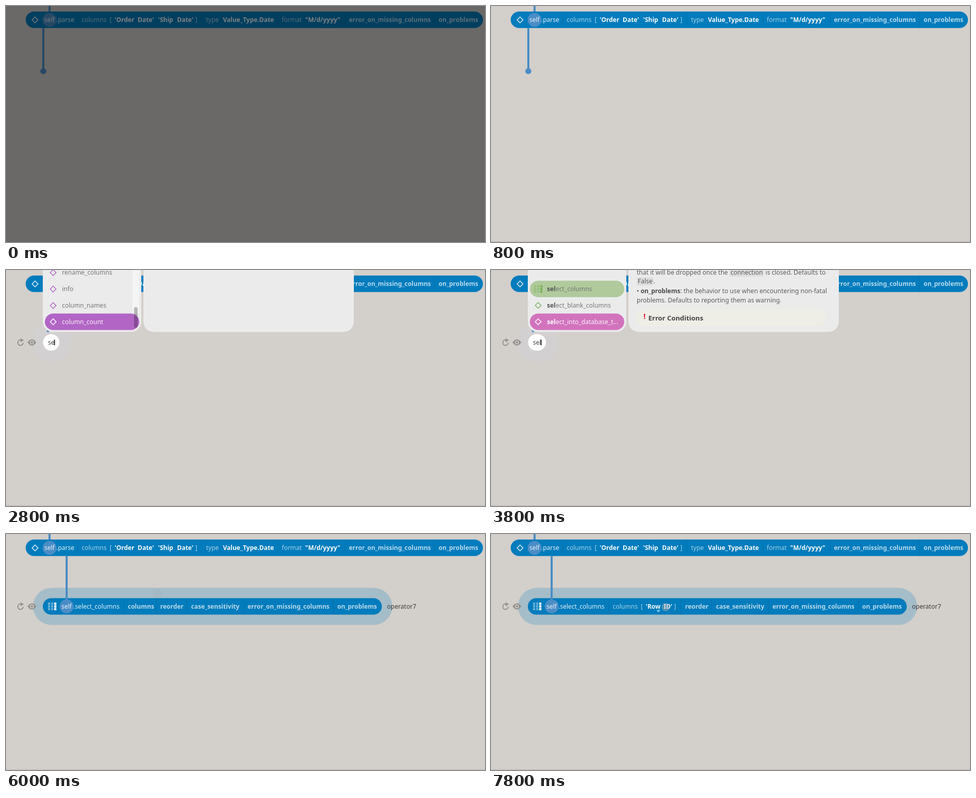
These frames come from a looping animation (924x458 px, 8 s). An HTML page with a canvas:

```html
<!DOCTYPE html>
<html lang="en">
<head>
<meta charset="utf-8">
<title>Node editor</title>
<style>
  html, body { margin: 0; width: 100%; height: 100%; overflow: hidden; background: #d3cfcb; }
  canvas { display: block; }
</style>
</head>
<body>
<canvas id="stage" width="924" height="458"></canvas>
<script>
const ctx = document.getElementById('stage').getContext('2d');
const LOOP = 8000, STEP = 200;
const FONT = '"Noto Sans", sans-serif';
const BLUE = '#027cbc', EDGE = '#4a8dc6', PANEL = '#ebebec', GREY = '#93908d';
const PURPLE = '#b265c5', PINK = '#d273bd', GREEN = '#79af5b', PALE_GREEN = '#b0ca9c';
const white = a => `rgba(255,255,255,${a})`;

const progress = (t, from, to) => Math.min(1, Math.max(0, (t - from) / (to - from)));
const ease = p => p * p * (3 - 2 * p);

function text(str, x, y, color, weight = 400, size = 12) {
  ctx.font = `${weight} ${size}px ${FONT}`;
  ctx.fillStyle = color;
  ctx.fillText(str, x, y);
  return x + ctx.measureText(str).width;
}

function box(x, y, w, h, r, color) {
  ctx.beginPath();
  ctx.roundRect(x, y, w, h, r);
  ctx.fillStyle = color;
  ctx.fill();
}

function disc(x, y, r, color) {
  ctx.beginPath();
  ctx.arc(x, y, r, 0, 7);
  ctx.fillStyle = color;
  ctx.fill();
}

function triangle(ax, ay, bx, by, cx, cy, color) {
  ctx.beginPath();
  ctx.moveTo(ax, ay);
  ctx.lineTo(bx, by);
  ctx.lineTo(cx, cy);
  ctx.fillStyle = color;
  ctx.fill();
}

function faded(alpha, draw) {
  if (alpha <= 0) return;
  ctx.save();
  ctx.globalAlpha = alpha;
  draw();
  ctx.restore();
}

function diamond(x, y, color) {
  ctx.save();
  ctx.translate(x, y);
  ctx.rotate(Math.PI / 4);
  ctx.strokeStyle = color;
  ctx.lineWidth = 1.4;
  ctx.strokeRect(-4, -4, 8, 8);
  ctx.restore();
}

// Table icon whose last column is emphasised.
function tableIcon(x, y, color) {
  for (let col = 0; col < 3; col++)
    for (let row = 0; row < 3; row++)
      faded(col === 2 ? 1 : 0.4, () => box(x + col * 6, y + row * 5.3, 4.2, 4.4, 0.5, color));
}

function nodeIcons() {
  ctx.strokeStyle = GREY;
  ctx.lineWidth = 1.8;
  ctx.beginPath();
  ctx.arc(28, 141, 5.3, 0, 4.7);
  ctx.stroke();
  triangle(28, 132.5, 34.5, 136.2, 28, 140, GREY);

  ctx.beginPath();
  ctx.moveTo(41.5, 140.5);
  ctx.quadraticCurveTo(50, 128.5, 58.5, 140.5);
  ctx.quadraticCurveTo(50, 152.5, 41.5, 140.5);
  ctx.fill();
  disc(50, 140.5, 3.8, '#d3cfcb');
  disc(50, 140.5, 2.2, GREY);
}

const separators = (xs, y) => xs.forEach(x => box(x, y, 1, 31, 0, 'rgba(0,0,0,.07)'));
const label = (str, x, y) => text(str, x, y, white(0.66));
const value = (str, x, y) => text(str, x, y, white(0.98), 700);
const unset = (str, x, y) => text(str, x, y, white(0.72), 700);

function selfPort(x, y, method) {
  disc(x, y, 13.5, EDGE);
  text('self', x - 10, y + 4.3, white(0.88));
  text(method, x + 13, y + 4.3, white(0.88));
}

function parseNode() {
  const y = 31.3;
  box(82, 0, 4, 12, 0, EDGE);
  box(38, 10.75, 882, 32, 16, BLUE);
  separators([138, 378, 524, 654, 826], 11);
  diamond(56, 27, white(0.9));
  selfPort(84, 27, '.parse');
  label('columns', 146, y);
  label('[', 200, y);
  value("'Order", 209.5, y);
  value("Date'", 254, y);
  value("'Ship", 293.5, y);
  value("Date'", 330, y);
  label(']', 365, y);
  label('type', 386, y);
  value('Value_Type.Date', 418.5, y);
  label('format', 532, y);
  value('"M/d/yyyy"', 577, y);
  unset('error_on_missing_columns', 661.5, y);
  unset('on_problems', 834.5, y);
}

function selectNode(t) {
  const y = 145;
  const open = ease(progress(t, 6900, 7500));
  const shift = 77 * open;
  faded(progress(t, 5400, 5800), () => {
    box(52, 104.5, 693 + shift, 72, 36, 'rgba(0,124,188,.22)');
    nodeIcons();
  });
  box(71, 124.5, 654 + shift, 32, 16, BLUE);
  separators([227, 289 + shift, 348 + shift, 458 + shift, 631 + shift], 125);
  tableIcon(81, 133, '#fff');
  box(115, 42.5, 4, 88, 0, EDGE);
  selfPort(117, 140.5, '.select_columns');

  (open > 0 ? label : unset)('columns', 235, y);
  faded(open, () => {
    label('[', 289, y);
    value("'Row", 298.5, y);
    value("ID'", 333, y);
    label(']', 353, y);
    triangle(319, 147.5, 327, 147.5, 323, 152.5, '#7cc3e8');
  });
  unset('reorder', 297.5 + shift, y);
  unset('case_sensitivity', 357 + shift, y);
  unset('error_on_missing_columns', 466 + shift, y);
  unset('on_problems', 639 + shift, y);
  text('operator7', 735 + shift, y, '#3c3b3a');
}

function listItem(name, y, color, highlight, match = 0) {
  if (highlight) box(75, y - 16, 182, 32, 16, highlight);
  const solid = highlight && highlight !== PALE_GREEN;
  const tint = solid ? '#fff' : color;
  if (name === 'select_columns') tableIcon(83, y - 7.5, tint);
  else diamond(91, y, tint);
  const x = text(name.slice(0, match), 108, y + 4.3, solid ? '#fff' : '#555', 700);
  text(name.slice(match), x, y + 4.3, solid ? white(0.92) : '#777');
}

function fullList() {
  listItem('rename_columns', 5, PURPLE);
  listItem('info', 37, PURPLE);
  listItem('column_names', 69, PURPLE);
  listItem('column_count', 100.5, PURPLE, PURPLE);
  box(244, 0, 13, 84, 0, white(0.45));
  box(247, 72, 7, 40, 3.5, 'rgba(0,0,0,.25)');
}

function filteredList(t) {
  const picked = t >= 4200;
  const top = picked ? GREEN : t >= 3800 ? PALE_GREEN : null;
  listItem('select_columns', 36.7, GREEN, top, 3);
  listItem('select_blank_columns', 68.7, GREEN, null, 3);
  listItem('select_into_database_t…', 100.4, PINK, picked ? null : PINK, 3);
}

// Inline markup: *bold* and `code`.
function richLine(line, y) {
  let x = 281;
  for (const part of line.split(/(\*.+?\*|`.+?`)/)) {
    const inner = part.slice(1, -1);
    if (part[0] === '*') x = text(inner, x, y, '#4c4c4c', 600);
    else if (part[0] === '`') {
      ctx.font = `12px ${FONT}`;
      box(x, y - 12, ctx.measureText(inner).width + 4, 16, 4, '#dededf');
      x = text(inner, x + 2, y, '#5c5c5c') + 2;
    } else x = text(part, x, y, '#5c5c5c');
  }
}

function databaseDocs() {
  richLine('that it will be dropped once the `connection` is closed. Defaults to', 9);
  richLine('`False`.', 26);
  richLine('• *on_problems*: the behavior to use when encountering non-fatal', 45);
  richLine('problems. Defaults to reporting them as warning.', 62.5);
  box(281, 75.5, 364, 33.5, 10, '#eeede6');
  text('!', 294, 95, '#cf1f3d', 700, 15);
  text('Error Conditions', 303.5, 97.5, '#444', 600, 13);
}

function columnsDocs() {
  richLine('in the output table will match the order in the columns list. If a', 6);
  richLine('column is matched by multiple selectors in reorder mode, it will', 23.7);
  richLine('be placed at the position of the first one matched.', 41);
  richLine('• *error_on_missing_columns*: Specifies if a missing input column', 60);
  richLine('should result in an error regardless of the `on_problems` settings.', 77.3);
  richLine('Defaults to `True`.', 94.7);
  richLine('• *on_problems*: Specifies how to handle problems if they occur,', 113.3);
}

function browser(t) {
  const typed = 'sel'.slice(0, Math.max(0, Math.floor((t - 2400) / 200)));
  ctx.font = `12px ${FONT}`;
  const inputWidth = 19 + ctx.measureText(typed).width;
  const hovered = t < 4200;

  if (hovered) {
    box(52, 104.5, inputWidth + 42, 73, 32, 'rgba(212,212,226,.25)');
    nodeIcons();
  }
  box(79, 42, 4, 78.5, 0, EDGE);
  box(71, -30, 190, 150.3, 20, PANEL);
  box(265, -30, 406, 150.3, 20, PANEL);
  if (typed.length < 3) fullList();
  else filteredList(t);
  if (t >= 4200) columnsDocs();
  else if (t >= 3200) databaseDocs();

  box(71.5, 124.5, inputWidth, 32, Math.min(16, inputWidth / 2), '#fff');
  const caret = text(typed, 81, 144.7, '#444');
  box(caret - 1, 135, hovered ? 2 : 1, 11, 0, '#333');
}

// time, x, y, opacity
const POINTER = [
  [3800, 110, 70, 0], [4400, 168, 43, 0.35], [5200, 168, 43, 0.35], [6000, 292, 117, 0.04],
  [6800, 262, 140, 0.2], [7200, 300, 141, 0.3], [7800, 337, 142, 0.4]
];

function pointer(t) {
  const next = POINTER.findIndex(key => key[0] >= t);
  if (next < 1) return;
  const a = POINTER[next - 1], b = POINTER[next];
  const p = ease(progress(t, a[0], b[0]));
  const [, x, y, alpha] = a.map((v, i) => v + (b[i] - v) * p);
  faded(alpha, () => disc(x, y, 8, t > 6000 ? '#b9b3b0' : '#666'));
}

function render(now) {
  const t = Math.floor((now % LOOP) / STEP) * STEP;
  box(0, 0, 924, 458, 0, '#d3cfcb');
  box(0, 456.5, 924, 1.5, 0, '#c5c2be');

  parseNode();
  if (t < 1000) {
    box(70, 42.5, 4, 80, 0, EDGE);
    disc(72, 126.5, 5.8, EDGE);
  } else if (t < 5400) faded(progress(t, 800, 1200), () => browser(t));
  else selectNode(t);
  pointer(t);

  if (t < 200) box(0, 0, 924, 458, 0, 'rgba(0,0,0,.495)');
  requestAnimationFrame(render);
}
requestAnimationFrame(render);
</script>
</body>
</html>
```
